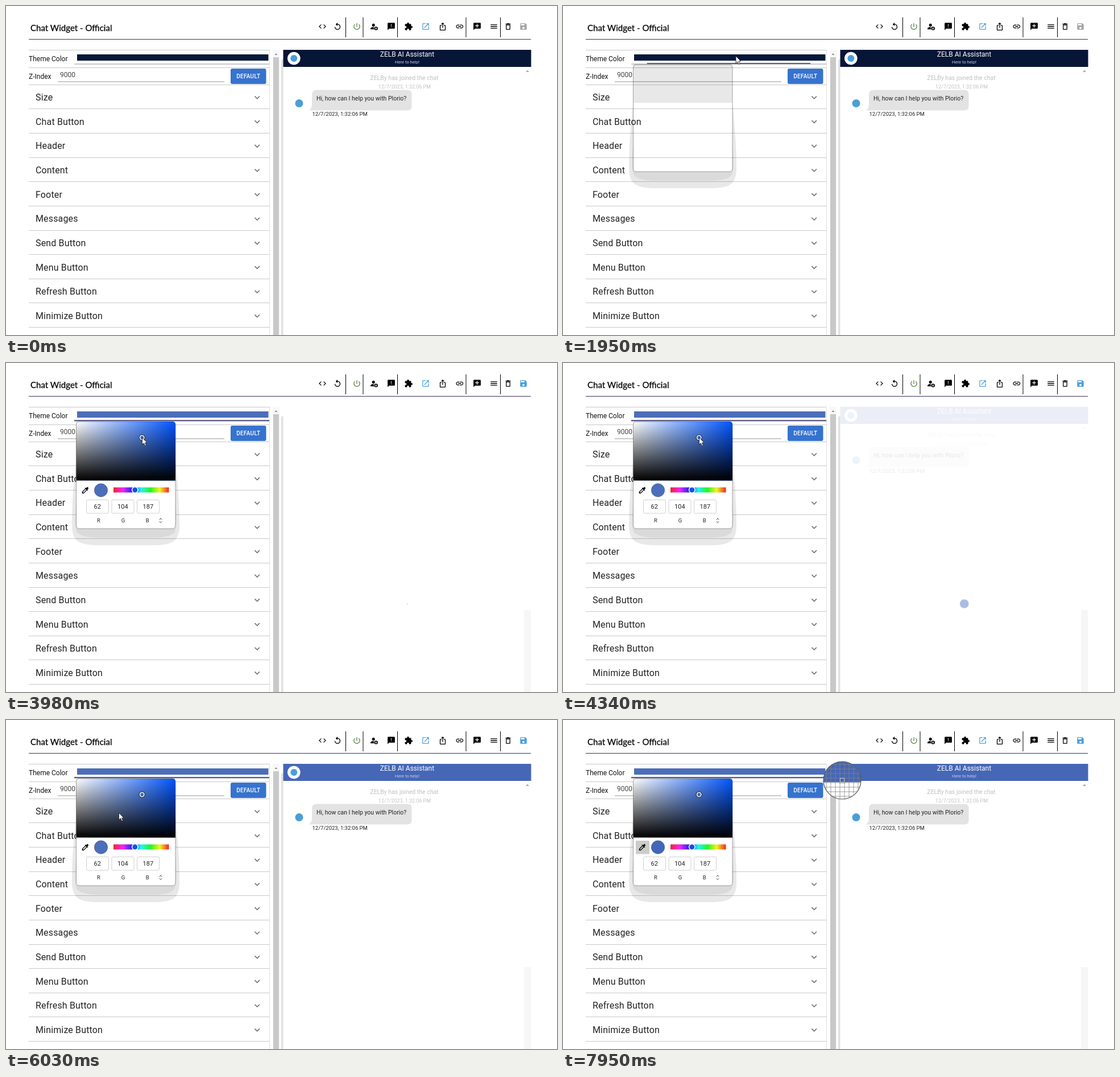
Animation of 969x578 px, one loop 8 s. Source, as an HTML page:

```html
<!DOCTYPE html>
<html lang="en">
<head>
<meta charset="utf-8">
<title>Chat widget settings</title>
<style>
  html, body { margin: 0; width: 100%; height: 100%; overflow: hidden; background: #fff; }
  svg { display: block; width: 969px; height: 578px; font-family: Roboto, Arial, sans-serif; }
  .title { font-family: Lato, "Open Sans", sans-serif; }
  .mid { text-anchor: middle; }
</style>
</head>
<body>
<svg id="stage" viewBox="0 0 969 578">
  <defs>
    <linearGradient id="sat"><stop stop-color="#fff"/><stop offset="1" stop-color="#05f"/></linearGradient>
    <linearGradient id="val" x2="0" y2="1"><stop stop-opacity="0"/><stop offset="1"/></linearGradient>
    <linearGradient id="hue"></linearGradient>
    <clipPath id="lens"><circle r="33"/></clipPath>
    <clipPath id="panel"><rect x="123.5" y="103" width="174.5" height="188" rx="5"/></clipPath>
  </defs>
  <g id="scene">
    <rect width="969" height="578" fill="#fff"/>
    <text class="title" x="43" y="44" font-size="15" stroke="#000" stroke-width=".25">Chat Widget - Official</text>
    <path d="M40 58.5H923" stroke="#37325f"/>
    <g id="tools"></g>

    <g id="settings">
      <path d="M40 77.5H463M40 108.5H463" stroke="#c8c8c8"/>
      <path d="M463.5 77V578" stroke="#dedede"/>
      <text x="40" y="97" font-size="12" fill="#111">Theme Color</text>
      <rect id="bar" x="125" y="85" width="336.5" height="11"/>
      <path d="M120 102H463" stroke="#949494"/>
      <path id="focus" d="M-171.5 0H171.5" stroke="#5d5985" stroke-width="2"/>
      <text x="40" y="128" font-size="12" fill="#111">Z-Index</text>
      <text x="95" y="125" font-size="12" fill="#444">9000</text>
      <path id="field" d="M91 133H384"/>
      <rect x="395" y="110" width="62.5" height="27" rx="3" fill="#3673ce"/>
      <text class="mid" x="426.3" y="126.5" font-size="10" font-weight="500" letter-spacing=".28" fill="#fff">DEFAULT</text>
      <g id="rows"></g>
      <rect x="469" y="77" width="12" height="501" fill="#f8f8f8"/>
      <path d="M472.5 86l2.5-3 2.5 3z" fill="#888"/>
      <rect x="470" y="90" width="10" height="488" fill="#c8c8c8"/>
      <path d="M484 98q0-5 3.5-5v485H484z" fill="#e1e1e1"/>
    </g>

    <rect id="track" x="911" y="434" width="12" height="144" fill="#f6f6f6"/>
    <g id="chat">
      <rect id="head" x="487.5" y="77" width="436" height="30"/>
      <circle cx="506.3" cy="92" r="11.3" fill="#fff"/>
      <circle cx="506.3" cy="92" r="6" fill="#4a9fd8"/>
      <text class="mid" x="705.5" y="89" font-size="12" fill="#fff">ZELB AI Assistant</text>
      <text class="mid" x="705.5" y="101" font-size="7.6" fill="#cbd1e0">Here to help!</text>
      <path d="M914 116l3-3.5 3 3.5z" fill="#aaa"/>
      <text class="mid" x="700.5" y="130" font-size="10.5" fill="#c0c0c0">ZELBy has joined the chat</text>
      <text class="mid" x="701" y="144.5" font-size="9" fill="#c4c4c4">12/7/2023, 1:32:06 PM</text>
      <circle cx="515.5" cy="171" r="7" fill="#4a9fd8"/>
      <path d="M546 147.5H706Q713.500 147.500 713.500 155V176Q713.500 183.500 706 183.500H533Q538 180 538 172V155.500Q538 147.500 546 147.500Z" fill="#e3e3e3"/>
      <text x="546" y="166" font-size="10.5" fill="#222">Hi, how can I help you with Plorio?</text>
      <text x="538.500" y="193" font-size="9.5" fill="#222">12/7/2023, 1:32:06 PM</text>
    </g>
    <circle id="pulse" cx="705.7" cy="423" fill="#3e68bb"/>

    <g id="picker">
      <path fill-rule="evenodd" fill-opacity=".09" d="M123.500 170C120 200 116 240 116 285C116 312 128 320 160 320H262C294 320 305 312 305 285C305 240 301 200 298 170ZM123.500 103V286Q123.500 291 128.500 291H293Q298 291 298 286V103Z"/>
      <path fill-opacity=".06" d="M123.500 240Q119 285 124 296Q130 306 160 307H262Q292 306 297 296Q302 285 298 240V286Q298 291 293 291H128.500Q123.500 291 123.500 286Z"/>
      <g id="body">
        <g clip-path="url(#panel)">
          <rect x="123" y="102" width="176" height="190" fill="#fff"/>
          <rect x="123" y="103" width="175" height="103.500" fill="url(#sat)"/>
          <rect x="123" y="103" width="175" height="103.500" fill="url(#val)"/>
        </g>
        <g id="ring" fill="none"><circle r="4.800" stroke="#111" stroke-width="1.200"/><circle r="3.700" stroke="#fff" stroke-width="1.600"/></g>
        <rect id="press" x="128" y="212" width="24" height="23.500" rx="1" fill="#cbcbcb"/>
        <g id="dropper"></g>
        <circle id="swatch" cx="167" cy="223.500" r="11.800" stroke="#000" stroke-opacity=".25" stroke-width=".8"/>
        <rect x="189" y="218.500" width="97.500" height="9" fill="url(#hue)"/>
        <circle cx="226.800" cy="223" r="5.200" fill="#1450ee" stroke="#fff" stroke-width="1.500"/>
        <g id="inputs" class="mid"></g>
        <path d="M269.800 275.200l2.200-2.200 2.200 2.200M269.800 278.300l2.200 2.200 2.200-2.200" fill="none" stroke="#333"/>
      </g>
      <rect x="123.500" y="103" width="174.500" height="188" rx="5" fill="none" stroke="#000" stroke-opacity=".35"/>
    </g>
  </g>

  <g id="loupe">
    <g clip-path="url(#lens)">
      <use id="zoom" href="#scene"/>
      <path id="grid" stroke="#858585" stroke-width=".8"/>
      <rect x="-4" y="-4" width="8" height="8" fill="none" stroke="#fff"/>
      <rect x="-4.700" y="-4.700" width="9.400" height="9.400" fill="none" stroke="#555" stroke-width=".6"/>
    </g>
    <circle r="33" fill="none" stroke="#5a5a5a" stroke-width="1.200"/>
  </g>
  <path id="cursor" d="M0 0V12.500L2.900 9.800L5 14.500L7 13.600L5 9.100H8.700Z" fill="#fff" stroke="#222" stroke-width=".9"/>
</svg>
<script>
const LOOP = 8000;
const NS = "http://www.w3.org/2000/svg";
const $ = id => document.getElementById(id);

function add(parent, tag, attrs, text) {
  const el = document.createElementNS(NS, tag);
  for (const k in attrs) el.setAttribute(k, attrs[k]);
  if (text !== undefined) el.textContent = text;
  return parent.appendChild(el);
}

function icon(parent, d, x, y, fill = "#000", k = 0.64) {
  return add(parent, "path", { d, fill, "fill-rule": "evenodd",
    transform: `translate(${x} ${y}) scale(${k}) translate(-12 -12)` });
}

const bubble = "M20 2H4c-1.100 0-2 .9-2 2v18l4-4h14c1.100 0 2-.9 2-2V4c0-1.100-.9-2-2-2z";
const shapes = {
  code: "M9.4 16.6 4.8 12l4.6-4.6L8 6l-6 6 6 6zm5.2 0 4.6-4.6-4.6-4.6L16 6l6 6-6 6z",
  replay: "M12 5V1L7 6l5 5V7c3.31 0 6 2.69 6 6s-2.69 6-6 6-6-2.69-6-6H4c0 4.42 3.58 8 8 8s8-3.58 8-8-3.58-8-8-8z",
  power: "M13 3h-2v10h2zm4.83 2.17-1.42 1.42C17.99 7.86 19 9.81 19 12c0 3.87-3.13 7-7 7s-7-3.13-7-7c0-2.19 1.01-4.14 2.58-5.42L6.17 5.17C4.23 6.82 3 9.26 3 12c0 4.97 4.03 9 9 9s9-4.03 9-9c0-2.74-1.23-5.18-3.17-6.83z",
  person: "M10 4a4 4 0 1 1 0 8a4 4 0 1 1 0-8zM10.700 13C8 12.800 2 14.400 2 18v2h9.500c-1-2.200-1-5-.8-7zM16 12h2l.4 1.500 1.500.7 1.600-.5 1 1.800-1.100 1.200v1.100l1.100 1.300-1 1.700-1.600-.4-1.500.8-.4 1.500h-2l-.4-1.500-1.500-.8-1.600.4-1-1.700 1.100-1.300v-1.100l-1.100-1.200 1-1.800 1.600.5 1.500-.7zM17 15.400a2 2 0 1 0 0 4a2 2 0 1 0 0-4z",
  feedback: bubble + "M13 14h-2v-2h2zm0-4h-2V6h2z",
  puzzle: "M20.5 11H19V7c0-1.1-.9-2-2-2h-4V3.5C13 2.12 11.88 1 10.5 1S8 2.12 8 3.5V5H4c-1.1 0-2 .9-2 2v3.8h1.500c1.49 0 2.7 1.21 2.7 2.7s-1.21 2.7-2.7 2.7H2V20c0 1.1.9 2 2 2h3.8v-1.5c0-1.49 1.21-2.7 2.7-2.7s2.7 1.21 2.7 2.7V22H17c1.1 0 2-.9 2-2v-4h1.5c1.38 0 2.5-1.12 2.5-2.5S21.88 11 20.5 11z",
  open: "M19 19H5V5h7V3H5c-1.11 0-2 .9-2 2v14c0 1.1.89 2 2 2h14c1.1 0 2-.9 2-2v-7h-2zM14 3v2h3.59l-9.83 9.83 1.41 1.41L19 6.41V10h2V3z",
  share: "m16 5-1.42 1.42-1.59-1.59V16h-1.98V4.83L9.42 6.42 8 5l4-4zm4 5v11c0 1.1-.9 2-2 2H6c-1.11 0-2-.9-2-2V10c0-1.11.89-2 2-2h3v2H6v11h12V10h-3V8h3c1.1 0 2 .89 2 2z",
  link: "M3.9 12c0-1.71 1.39-3.1 3.1-3.1h4V7H7c-2.76 0-5 2.24-5 5s2.24 5 5 5h4v-1.9H7c-1.71 0-3.1-1.39-3.1-3.1zM8 13h8v-2H8zm9-6h-4v1.9h4c1.71 0 3.1 1.39 3.1 3.1s-1.39 3.1-3.1 3.1h-4V17h4c2.76 0 5-2.24 5-5s-2.24-5-5-5z",
  plus: bubble + "M17 11h-4v4h-2v-4H7V9h4V5h2v4h4z",
  menu: "M3 18h18v-2H3zm0-5h18v-2H3zm0-7v2h18V6z",
  trash: "M6 19c0 1.1.9 2 2 2h8c1.1 0 2-.9 2-2V7H6zM8 9h8v10H8zm7.5-5-1-1h-5l-1 1H5v2h14V4z",
  save: "M17 3H5c-1.11 0-2 .9-2 2v14c0 1.1.89 2 2 2h14c1.1 0 2-.9 2-2V7zm-5 16c-1.66 0-3-1.34-3-3s1.34-3 3-3 3 1.34 3 3-1.34 3-3 3zm3-10H5V5h10z",
  chevron: "M7.41 8.59 12 13.17l4.59-4.58L18 10l-6 6-6-6z",
  dropper: "M20.71 5.63l-2.34-2.34c-.39-.39-1.02-.39-1.41 0l-3.12 3.12-1.93-1.91-1.41 1.41 1.42 1.42L3 16.25V21h4.75l8.92-8.92 1.42 1.42 1.41-1.41-1.92-1.92 3.12-3.12c.4-.4.4-1.03.01-1.42zM6.92 19L5 17.08l8.06-8.06 1.92 1.92z"
};

const blue = "#4a9fdc";
const tools = [["code", 556.5], ["replay", 583], ["power", 617, "#56813f"], ["person", 647.5],
  ["feedback", 677.5], ["puzzle", 708], ["open", 738, blue], ["share", 768],
  ["link", 797.8], ["plus", 828.5], ["menu", 858], ["trash", 883]];
for (const [name, x, fill] of tools) icon($("tools"), shapes[name], x, 36, fill);
const save = icon($("tools"), shapes.save, 910, 36);
add($("tools"), "path", { d: [597.5, 628, 688.5, 809, 869.5].map(x => `M${x} 20V55`).join(""), stroke: "#000" });

const rowNames = ["Size", "Chat Button", "Header", "Content", "Footer", "Messages",
  "Send Button", "Menu Button", "Refresh Button", "Minimize Button"];
rowNames.forEach((name, i) => {
  const y = 42.65 * i;
  add($("rows"), "text", { x: 52, y: 166 + y, "font-size": 16, "letter-spacing": 0.15, fill: "#222" }, name);
  icon($("rows"), shapes.chevron, 441.7, 160.7 + y, "#707070", 0.8);
});
for (let i = 0; i <= rowNames.length; i++)
  add($("rows"), "path", { d: `M40 ${Math.round(138.6 + 42.65 * i) - 0.5}H463`, stroke: "#c8c8c8" });

for (let i = 0; i <= 6; i++)
  add($("hue"), "stop", { offset: i / 6, "stop-color": `hsl(${360 - i * 60} 90% 55%)` });
icon($("dropper"), shapes.dropper, 139.5, 223.5);
const channels = [..."RGB"].map((letter, i) => {
  const x = 141.5 + 44.5 * i;
  add($("inputs"), "rect", { x, y: 240.5, width: 39, height: 23.5, rx: 2, fill: "#fff", stroke: "#d0d0d0" });
  add($("inputs"), "text", { x: [163, 206, 248.7][i], y: 280, "font-size": 9.5, fill: "#222" }, letter);
  return add($("inputs"), "text", { x: x + 19.3, y: 256, "font-size": 11, fill: "#222" });
});

let gridPath = "";
for (let p = -36; p <= 36; p += 8) gridPath += `M${p} -36V36M-36 ${p}H36`;
$("grid").setAttribute("d", gridPath);

// Each key: time, x, y
const pointer = [[840, 639, 490], [1020, 632, 268], [1110, 632, 268], [1710, 304, 88],
  [2440, 304, 88], [3070, 252, 145], [3160, 252, 145], [3430, 239.5, 131],
  [5760, 239.5, 131], [6390, 136, 212], [6570, 143, 222.5]];
const lensPath = [[6900, 144, 216], [7470, 331, 180], [7530, 331, 180], [7950, 491, 106]];

const clamp = v => Math.max(0, Math.min(1, v));
const smooth = p => p * p * (3 - 2 * p);
function along(keys, t) {
  let i = 0;
  while (i < keys.length - 2 && t >= keys[i + 1][0]) i++;
  const [a, b] = [keys[i], keys[i + 1]];
  const p = smooth(clamp((t - a[0]) / (b[0] - a[0])));
  return [a[1] + (b[1] - a[1]) * p, a[2] + (b[2] - a[2]) * p];
}

const set = (id, attrs) => { for (const k in attrs) $(id).setAttribute(k, attrs[k]); };
const show = (id, on) => $(id).setAttribute("display", on ? "inline" : "none");

function draw(t) {
  const picked = t >= 3890, dropping = t >= 6840;
  const [x, y] = along(pointer, t);
  show("cursor", t >= 840 && t < 6690);
  set("cursor", { transform: `translate(${x} ${y})` });

  const hover = t < 1890 && t > 1300 && x < 400 && y < 138;
  set("field", { stroke: hover ? "#222" : "#949494" });
  const grow = 1 - (1 - clamp((t - 1878) / 200)) ** 4;
  show("focus", grow > 0);
  set("focus", { transform: `translate(291.5 101) scale(${grow} 1)` });

  show("picker", t >= 1890);
  show("body", t >= 2010);
  const ink = picked ? "#4c6eba" : "#071739";
  set("bar", { fill: ink });
  set("swatch", { fill: dropping ? "#4267b8" : ink });
  set("head", { fill: picked ? "#4667b6" : "#071536" });
  set("ring", { transform: picked ? "translate(239.2 131)" : "translate(276 182.500)" });
  save.setAttribute("fill", picked ? blue : "#a6a6a6");
  (picked ? [62, 104, 187] : [6, 23, 57]).forEach((v, i) => { channels[i].textContent = v; });

  show("track", picked);
  set("chat", { opacity: t < 3950 ? 1 : clamp((t - 4300) / 400) });
  const p = (t - 3950) / 700;
  show("pulse", p >= 0 && t < 4460);
  set("pulse", { r: Math.max(0, 14 * p), opacity: clamp(1 - p) });

  show("press", dropping);
  show("loupe", t >= 7530 || (t >= 6900 && t < 7050));
  const [lx, ly] = t < 7050 ? [144, 216] : along(lensPath, t);
  set("loupe", { transform: `translate(${lx} ${ly})` });
  set("zoom", { transform: `scale(8) translate(${-lx - 1} ${-ly - 0.6})` });
}

function tick(now) {
  draw(now % LOOP);
  requestAnimationFrame(tick);
}
draw(0);
requestAnimationFrame(tick);
</script>
</body>
</html>
```
